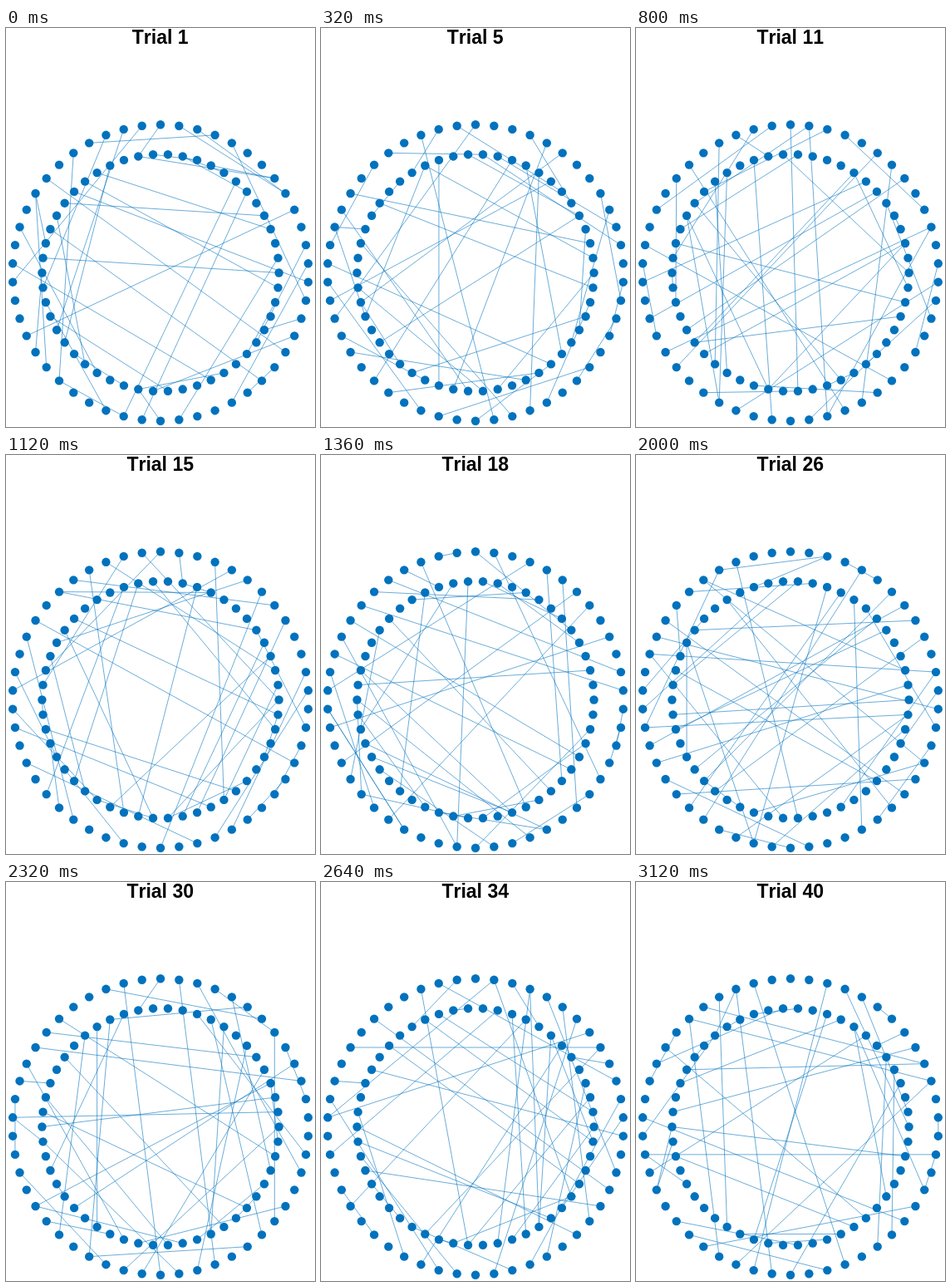
An HTML page for the animation above (3200 ms loop, 372 by 480 pixels).

```html
<!DOCTYPE html>
<html lang="en">
<head>
<meta charset="utf-8">
<title>Random graph trials</title>
<style>
  html, body { margin: 0; width: 100%; height: 100%; overflow: hidden; background: #fff; }
  svg { display: block; width: 372px; height: 480px; }
  text {
    font: bold 23px "Liberation Sans", Arial, sans-serif;
    font-kerning: none;
    text-anchor: middle;
  }
  #edges { fill: none; stroke: #0072bd; stroke-opacity: .58; stroke-width: 1; }
  #nodes { fill: #0072bd; }
</style>
</head>
<body>
<svg viewBox="0 0 372 480">
  <text id="title" x="185.7" y="19"></text>
  <path id="edges"/>
  <g id="nodes"></g>
</svg>
<script>
  const TRIALS = 40, STEP = 80, RING = 50;
  const PAIRS = 38, EXTRA = 6;
  const title = document.getElementById("title");
  const edges = document.getElementById("edges");

  // Two rings, clockwise from the top; the inner one is turned by half a step.
  const nodes = Array.from({ length: 2 * RING }, (_, i) => {
    const inner = i >= RING;
    const r = inner ? 142.6 : 178.2;
    const a = (i % RING + (inner ? 0.5 : 0)) * 2 * Math.PI / RING;
    return [186 + r * Math.sin(a), 294.5 - r * Math.cos(a)].map(v => v.toFixed(2));
  });
  document.getElementById("nodes").innerHTML =
    nodes.map(([x, y]) => `<circle cx="${x}" cy="${y}" r="5.2"/>`).join("");

  // Seeded generator (mulberry32).
  function random(seed) {
    let s = seed * 7919;
    return () => {
      s = (s + 0x6d2b79f5) | 0;
      let t = Math.imul(s ^ (s >>> 15), 1 | s);
      t = (t + Math.imul(t ^ (t >>> 7), 61 | t)) ^ t;
      return ((t ^ (t >>> 14)) >>> 0) / 4294967296;
    };
  }

  function shuffle(list, rnd) {
    for (let i = list.length - 1; i > 0; i--) {
      const j = Math.floor(rnd() * (i + 1));
      [list[i], list[j]] = [list[j], list[i]];
    }
    return list;
  }

  // Most nodes have one link; a few links more give some nodes two or three.
  function graph(trial) {
    const rnd = random(trial);
    const deal = pairs => shuffle([...nodes], rnd).slice(0, 2 * pairs);
    return [...deal(PAIRS), ...deal(EXTRA)]
      .map((p, i) => (i % 2 ? "L" : "M") + p.join(" ")).join("");
  }

  const graphs = Array.from({ length: TRIALS }, (_, i) => graph(i + 1));
  const start = performance.now();
  let shown = -1;

  function draw(now) {
    const i = Math.floor(Math.max(0, now - start) / STEP) % TRIALS;
    if (i !== shown) {
      shown = i;
      title.textContent = "Trial " + (i + 1);
      edges.setAttribute("d", graphs[i]);
    }
    requestAnimationFrame(draw);
  }
  draw(start);
</script>
</body>
</html>
```
